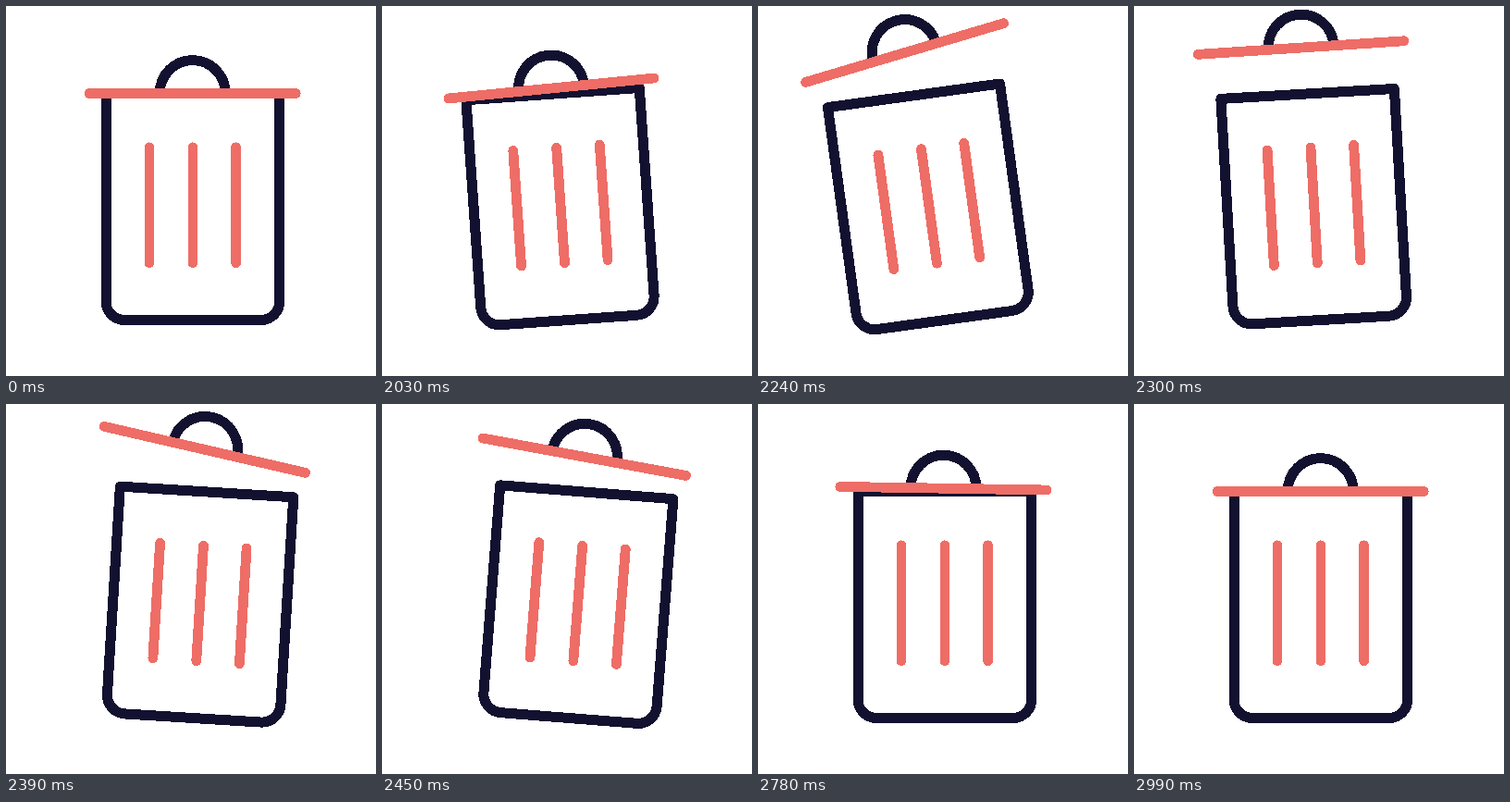
An HTML page for the animation above (3050 ms loop, 400 px wide and 400 px high).

```html
<!DOCTYPE html>
<html lang="en">
<head>
<meta charset="utf-8">
<title>Trash can</title>
<style>
  html, body { margin: 0; width: 100%; height: 100%; overflow: hidden; background: #fff; }
  svg { display: block; width: 100vw; height: 100vh; shape-rendering: crispEdges; }
  path { fill: none; stroke-width: 11; stroke-linecap: round; stroke-linejoin: round; }
  .navy { stroke: #121130; }
  .red { stroke: #ee6d66; stroke-width: 10.8; }
  .arch { stroke-linecap: butt; }
</style>
</head>
<body>
<svg viewBox="0 0 400 400">
  <g id="can">
    <path class="navy" d="M108 94.5H295.8V319.3A20.2 20.2 0 0 1 275.6 339.5H128.2A20.2 20.2 0 0 1 108 319.3Z"/>
    <path class="red" d="M154.9 152.8V277.6M201.9 152.8V277.6M248.6 152.8V277.6"/>
    <g id="lid">
      <path class="navy arch" d="M166.3 94.5V94A35.4 35.4 0 0 1 237.1 94V94.5"/>
      <path class="red" d="M90 94.5H313.2"/>
    </g>
  </g>
</svg>
<script>
const LOOP = 3050, START = 2030, STEP = 30, END = 32;
const can = document.getElementById('can');
const lid = document.getElementById('lid');

const ease = u => {
  u = Math.min(1, Math.max(0, u));
  return u * u * (3 - 2 * u);
};

// Eases from 0 through each [step, value] turning point in order.
function swing(k, from, ...turns) {
  let value = 0;
  for (const [to, next] of turns) {
    value += (next - value) * ease((k - from) / (to - from));
    from = to;
  }
  return value;
}

const tilt = k => swing(k, -4.4, [5.3, -9.4], [13.5, 4.8], [17, 0]);
const wobble = k => swing(k, -2, [6, -10.2], [12, 9.4], [18, -4.1], [24, 1], [30, 0]);
const drift = k => swing(k, -6, [18, -5.6], [28, 0]);
// A soft rise against a decaying fall.
const lift = k => -172 * ease((k + 2) / 17.5) * (1 - k / END) ** 2.6;

function draw(now) {
  const k = Math.min(END, Math.floor((now % LOOP - START) / STEP));
  const at = motion => k < 0 ? 0 : motion(k);
  can.setAttribute('transform', `rotate(${at(tilt)} 202 340)`);
  lid.setAttribute('transform',
    `translate(${at(drift)} ${at(lift)}) rotate(${at(wobble)} 201.6 94.5)`);
}

const origin = performance.now();
function tick() {
  draw(performance.now() - origin);
  requestAnimationFrame(tick);
}
tick();
</script>
</body>
</html>
```
